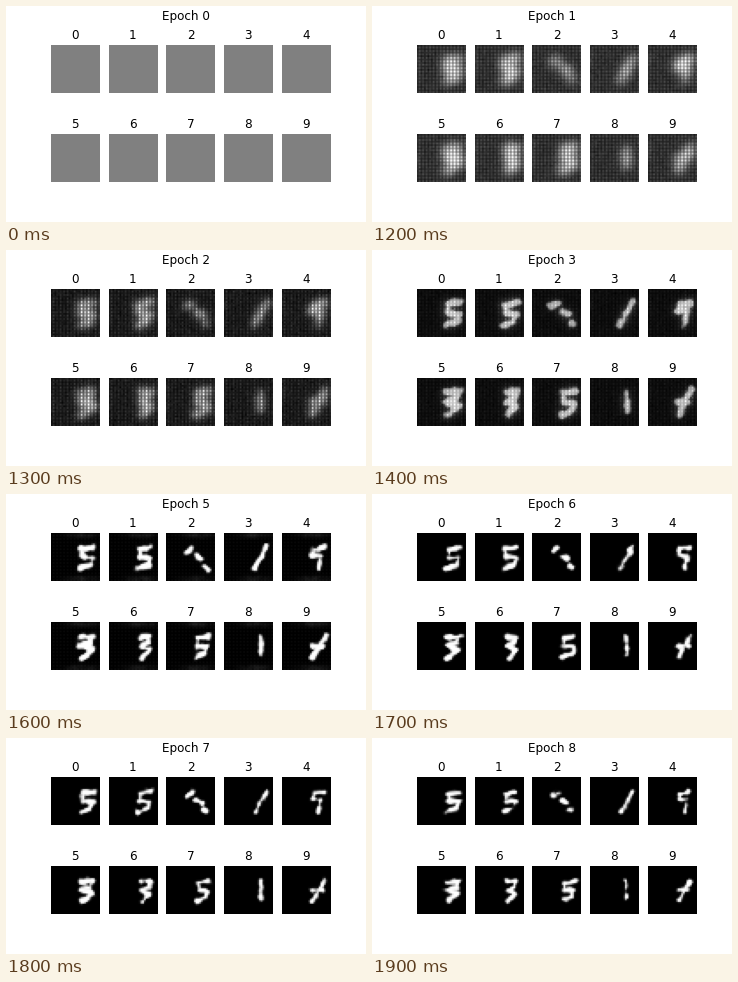
These frames come from a looping animation (360x216 px, 3 s). A matplotlib script:

```python
import numpy as np
import matplotlib.pyplot as plt
from matplotlib.animation import FuncAnimation

W, H, DPI = 360, 216, 72
N, SIDE = 28, 48.1
FRAMES, HOLD, LAST = 30, 11, 8

plt.rcParams["font.family"] = "DejaVu Sans"

row, col = np.mgrid[:N, :N]
X, Y = (col + 0.5) * SIDE / N, (row + 0.5) * SIDE / N
odd_x, odd_y = col % 2, row % 2
dots = odd_x * odd_y

# Each glyph is a list of strokes around its own centre
FIVE = [[(6, -11), (-5, -9), (-5, -1), (5, 0), (3, 7), (-7, 11)]]
THREE = [[(-4, -10), (4, -11), (2, -4), (-4, -1), (4, 3), (-3, 11)]]
SLASH = [[(6, -12), (0, 0), (-6, 11)]]
NINE = [[(6, -11), (-3, -9), (-5, -3), (3, -2), (1, 11)]]
BAR = [[(0, -11), (0, 8)]]
FOUR = SLASH + [[(-6, -1), (3, -1)]]
SPOTS = [[(-9, -7), (-4, -10)], [(1, -2), (6, 1)], [(9, 8), (11, 10)]]

# Glyph, centre x, horizontal stretch
TILES = [
    (FIVE, 36, 1), (FIVE, 35, 1), (SPOTS, 29, 1), (SLASH, 36, 1), (NINE, 35, 1),
    (THREE, 35, 1.6), (THREE, 36, 1), (FIVE, 36, 0.9), (BAR, 36, 1), (FOUR, 36, 1),
]


def smooth(a, times=1):
    for _ in range(times):
        for axis in (0, 1):
            a = (np.roll(a, 1, axis) + 2 * a + np.roll(a, -1, axis)) / 4
    return a


def distance(a, b):
    dx, dy = b - a
    t = ((X - a[0]) * dx + (Y - a[1]) * dy) / (dx * dx + dy * dy)
    t = np.clip(t, 0, 1)
    return np.hypot(X - a[0] - t * dx, Y - a[1] - t * dy)


def digit(k, epoch):
    """Strokes that shrink, thin out and drift a little with each epoch."""
    glyph, cx, stretch = TILES[k]
    rng = np.random.default_rng(100 * epoch + k)
    size = 1 - 0.045 * (epoch - 5)
    radius = 2.2 + 0.3 * max(6 - epoch, 0)
    wobble = smooth(rng.normal(0, 2.6, (N, N)), 2)
    out = np.zeros((N, N))
    for stroke in glyph:
        points = np.array(stroke) * (stretch * size, size) + (cx, 25)
        points += rng.normal(0, 0.4, points.shape)
        for a, b in zip(points, points[1:]):
            flat = abs(b[0] - a[0]) / np.hypot(*(b - a))
            d = distance(a, b) + wobble - radius * (0.7 + 0.4 * flat)
            out = np.maximum(out, 1 / (1 + np.exp(d / 0.4)))
    return out


def texture(k, epoch):
    """Early output: a wide glow seen through a grid that gets coarser."""
    rng = np.random.default_rng(epoch * 10 + k)
    shape = digit(k, 4)
    if epoch == 1:
        light = 0.215 + 1.0 * smooth(shape, 14)
        grid = 0.76 + 0.24 * odd_x + 0.25 * dots - 0.15 * (1 - odd_y)
    else:
        light = 0.15 + 0.65 * smooth(shape, 14) + 0.4 * smooth(shape, 4)
        grid = 0.5 + 0.45 * odd_x * (0.4 + 0.6 * odd_y) + 0.3 * (col % 4 == 1) * odd_y
    return light * grid + rng.normal(0, 0.02, (N, N))


def haze(k):
    """Grey streaks along the top and bottom, with faint grid dots."""
    rng = np.random.default_rng(k)
    edge = np.exp(-((np.abs(Y - 24) - 22) / 3) ** 2 - ((X - 31) / 15) ** 2)
    return 0.35 * edge * smooth(rng.random((N, N))) + 0.07 * dots


def picture(k, epoch):
    if epoch == 0:
        return np.full((N, N), 0.5)
    if epoch < 3:
        return texture(k, epoch)
    image = digit(k, epoch)
    if epoch == 3:
        return 0.5 * texture(k, 2) + 0.5 * image
    return image + haze(k) * max(6 - epoch, 0) / 2


EPOCHS = [[np.clip(picture(k, n), 0, 1) for k in range(10)] for n in range(LAST + 1)]

fig = plt.figure(figsize=(W / DPI, H / DPI), dpi=DPI, facecolor="white")
heading = fig.suptitle("Epoch 0", fontsize=12)
images = []
for k in range(10):
    left, bottom = 45 + 57.72 * (k % 5), 129 - 89 * (k // 5)
    ax = fig.add_axes([left / W, bottom / H, SIDE / W, 48 / H])
    ax.set_title(str(k), fontsize=12)
    ax.axis("off")
    images.append(ax.imshow(EPOCHS[0][k], cmap="gray", vmin=0, vmax=1, aspect="auto"))


def update(frame):
    epoch = min(max(frame - HOLD, 0), LAST)
    heading.set_text(f"Epoch {epoch}")
    for image, data in zip(images, EPOCHS[epoch]):
        image.set_data(data)
    return [heading, *images]


anim = FuncAnimation(fig, update, frames=FRAMES, interval=100, repeat=True, repeat_delay=0)
plt.show()
```
